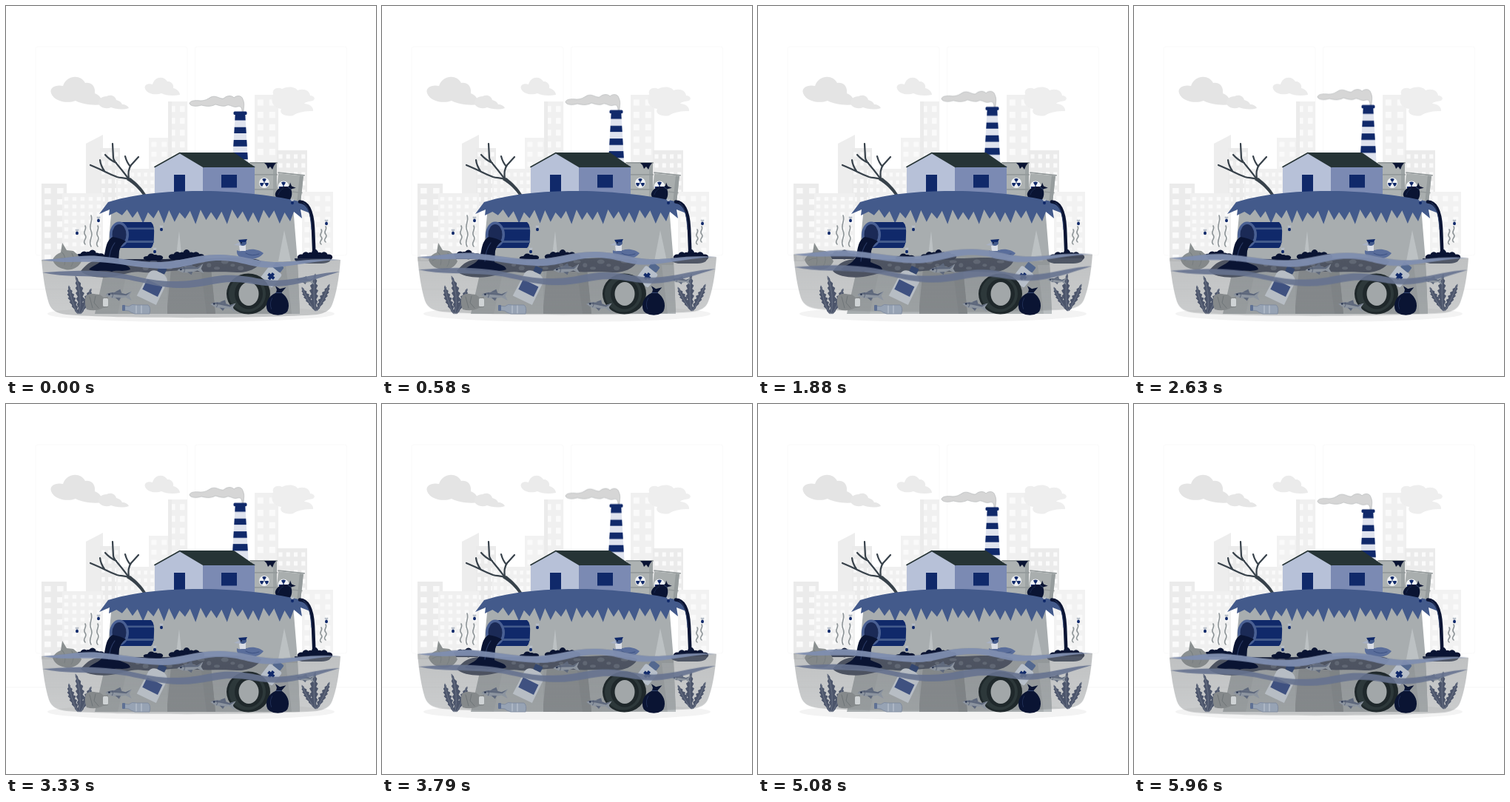
An HTML page for the animation above (6000 ms loop, 500x500 px).

```html
<!DOCTYPE html>
<html lang="en">
<head>
<meta charset="utf-8">
<title>Polluted island</title>
<style>
  html, body { margin: 0; width: 100%; height: 100%; overflow: hidden; background: #fff; }
  svg { display: block; width: 100vw; height: 100vh; }
</style>
</head>
<body>
<svg id="stage" viewBox="0 0 500 500"></svg>
<script>
const NAVY = '#10296a', INK = '#0a1433', SLATE = '#4c556b', CLIFF = '#a8adaf', BARK = '#37414a';

const path = (d, fill, extra = '') => `<path d="${d}" fill="${fill}" ${extra}/>`;
const line = (d, color, w) =>
  `<path d="${d}" fill="none" stroke="${color}" stroke-width="${w}" stroke-linecap="round" stroke-linejoin="round"/>`;
const rect = (x, y, w, h, fill, extra = '') =>
  `<rect x="${x}" y="${y}" width="${w}" height="${h}" fill="${fill}" ${extra}/>`;
const oval = (x, y, rx, ry, fill, extra = '') =>
  `<ellipse cx="${x}" cy="${y}" rx="${rx}" ry="${ry}" fill="${fill}" ${extra}/>`;
const group = (transform, body) => `<g transform="${transform}">${body}</g>`;
const range = n => Array.from({ length: n }, (_, i) => i);

// Block with a grid of pale windows
function building(x, y, w, h, cols, rows, fill = '#f0f0f0') {
  const cw = w / cols, rh = h / rows;
  let s = rect(x, y, w, h, fill);
  for (let r = 0; r < rows; r++)
    for (let c = 0; c < cols; c++)
      s += rect(x + cw * (c + .24), y + 3 + rh * (r + .2), cw * .5, rh * .5, '#fafafa');
  return s;
}

function city() {
  return building(336, 120, 32, 100, 2, 6) +
    building(366, 195, 41, 60, 4, 5, '#ebebeb') +
    building(400, 251, 42, 84, 3, 6, '#f2f2f2') +
    path('M108 186L131 174V270H108Z', '#ededed') +
    building(193, 178, 28, 80, 2, 6, '#f2f2f2') +
    building(219, 129, 26, 80, 2, 5) +
    rect(219, 129, 5, 80, '#ebebeb') +
    building(127, 192, 27, 85, 3, 7, '#ebebeb') +
    building(149, 220, 53, 42, 6, 4) +
    building(48, 240, 34, 105, 2, 7, '#ebebeb') +
    building(76, 253, 55, 82, 5, 8, '#f0f0f0');
}

const clouds = () =>
  path('M61 118C58 110 68 106 77 108C82 93 101 92 107 104C118 102 121 112 120 118C126 120 131 126 130 133C116 135 102 132 94 128C84 132 66 130 61 118Z', '#e4e4e4') +
  path('M125 132C124 126 130 122 136 122C142 119 148 122 149 127C153 128 156 130 157 133C161 133 165 135 166 138C157 141 148 139 142 137C135 140 127 137 125 132Z', '#e6e6e6') +
  path('M188 112C186 107 192 104 198 106C201 95 213 94 218 102C224 101 227 107 226 111C231 112 235 116 235 120C225 122 216 121 210 118C202 121 191 119 188 112Z', '#ebebeb') +
  path('M361 119C359 112 367 109 373 112C381 108 391 109 394 114C401 111 410 113 411 121C416 121 419 125 415 128C408 129 404 130 403 132C409 132 416 136 415 142C405 142 395 143 388 148C379 150 368 146 372 139C364 138 356 132 361 119Z', '#eeeeee');

function chimney() {
  const edge = (y, side) => 316.5 + side * (6.8 + (y - 147) * .058);
  const band = (a, b, fill) =>
    path(`M${edge(a, -1)} ${a}H${edge(a, 1)}L${edge(b, 1)} ${b}H${edge(b, -1)}Z`, fill);
  return path('M319 143C319 137 317 135 313 136C307 138 303 133 299 134C294 137 287 134 283 133C276 137 268 135 264 134C258 136 250 136 248 132C248 128 255 127 263 128C269 128 272 126 277 123C284 120 289 126 294 125C299 120 306 121 308 124C312 120 319 121 320 126C323 132 321 137 321 143Z',
      '#d6d6d6', 'stroke="#aeb1b2" stroke-width=".6"') +
    band(145, 225, '#dfe3ee') +
    range(4).map(i => band(146.500 + i * 17.2, 154.5 + i * 17.6, NAVY)).join('') +
    rect(307.5, 142.5, 18, 4.4, NAVY, 'rx="1.5"');
}

const tree = () =>
  path('M187 258C180 248 173 241 163 235L168 232C177 239 184 246 190 256Z', BARK) +
  line('M168 235C160 231 156 233 150 231Q142 228 134 224T114 215M133 223Q128 216 127 208', BARK, 2.2) +
  line('M166 234Q157 222 151 215T145 205L144 186M149 212Q140 208 134 201', BARK, 2.2) +
  line('M166 234Q164 222 169 215L179 204M168 217Q163 211 161 203', BARK, 2.2);

const house = () =>
  path('M201 218L235 199L267 218V253H201Z', '#b7c1d8') +
  path('M266 216H336V254H266Z', '#7b8ab3') +
  path('M234 198H308L337 218H267Z', '#263436') +
  line('M201 217.500L235 198.5L267 217.5', '#263436', 1.6) +
  rect(227, 228, 15, 24, NAVY) +
  rect(291, 228, 21, 17.5, NAVY);

// Hazard sign: disc with three blades
const hazard = (x, y, r) =>
  oval(x, y, r, r, '#f1f3f5') +
  [0, 120, 240].map(a => group(`translate(${x} ${y}) rotate(${a})`,
    path(`M0 0L${-r * .4} ${-r * .72}Q0 ${-r} ${r * .4} ${-r * .72}Z`, NAVY))).join('') +
  oval(x, y, r * .2, r * .2, '#f1f3f5') + oval(x, y, r * .12, r * .12, NAVY);

const garbage = (x, y, r, turn = 0) =>
  group(`translate(${x} ${y}) rotate(${turn}) scale(${r / 14})`,
    path('M-2 -14C-13 -10 -17 2 -13 10C-7 17 8 17 13 10C17 1 13 -9 5 -14L11 -21L3 -19L-3 -23L-1 -18Z', INK) +
    line('M-2 -14H5', '#34466f', 1.2) + line('M-7 -7Q-11 0 -8 7', '#1f2d54', 1));

const barrels = () =>
  rect(331, 212, 35, 46, '#adb2b2') + rect(361, 212, 5, 46, '#9da3a4') +
  [211, 227, 247].map(y => rect(329, y, 38, 1.8, '#949a9b', 'rx="1"')).join('') +
  path('M349 212H365L362 216L360 221L357 217L354 220L352 215Z', INK) +
  hazard(349, 239, 7) +
  group('rotate(6 384 247)',
    rect(366, 228, 34, 38, '#a9aeae') + rect(395, 228, 5, 38, '#969c9d') +
    rect(365, 226, 37, 1.8, '#949a9b', 'rx="1"') + rect(366, 250, 35, 1.6, '#949a9b')) +
  hazard(375, 244, 7.5) + garbage(376, 254, 10.5, 35);

const cliff = () =>
  path('M143 272H388L394 345L397 416H120L136 345Z', CLIFF) +
  path('M234 304L238 345H229ZM376 303L385 345H368Z', '#bcc1c3') +
  path('M224 345H276L283 416H217Z', '#898d90') +
  path('M262 345H276L283 416H271Z', '#808588') +
  path('M165 352L218 358V416H151Z', '#b1b6b8') +
  path('M378 350H394L397 416H386Z', '#b9bec0');

function turf() {
  let d = 'M126 281L138 265C180 252 226 250 268 250S372 257 399 265Q408 270 411 280L398 275L400 287L389 278';
  const n = 17;
  for (let i = 0; i < n; i++) {
    const x = 384 - i * 14.2;
    const tip = 291 + 4 * Math.sin(i * 2.3) - (i > 14 ? 5 : 0);
    d += `L${x} ${tip}L${x - 7.5} ${277 + 2 * Math.cos(i * 1.9)}`;
  }
  return path(d + 'L139 283L140 275Z', '#435a8b');
}

const pipe = () =>
  path('M153 292H196Q201 296 200 310Q200 324 196 327H153Z', NAVY) +
  rect(160, 299.5, 40, 2.6, '#435a8b') + rect(160, 317, 40, 3, '#435a8b') +
  oval(153, 309, 13, 17.5, '#4a6093') + oval(153, 309, 9.5, 14, '#1b2a56');

const flow = () =>
  path('M144 312C151 313 157 315 162 318Q155 323 153 331L152 346C157 349 167 350 168 356C158 360 150 356 143 359C133 356 120 360 112 356C117 350 126 350 132 340C135 331 134 318 144 312Z', INK) +
  line('M147 320Q140 329 139 345', '#2a3a63', 1.2);

// Lumpy heap resting on a base line
function pile(x, w, y, h) {
  const n = Math.round(w / 7);
  return range(n + 1).map(i => {
    const t = i / n, r = h * (.45 + .35 * Math.sin(Math.PI * t) + .12 * Math.sin(i * 2.6));
    return oval(x + 3 + t * (w - 6), y - r * .5, 5.2, r * .8, INK);
  }).join('') + rect(x, y - 3, w, 5, INK, 'rx="2.5"');
}

const sludge = () =>
  path('M101 358C108 351 112 343 132 342H215C245 340 270 342 300 340C320 340 340 341 345 345C342 353 328 361 312 360C288 358 272 361 250 358C226 355 208 362 186 360C171 357 158 364 142 366C128 368 108 366 101 358Z', '#232b43') +
  range(15).map(i => oval(178 + i * 10.7, 350 + 5 * Math.sin(i * 2.1), 3 + i % 3, 2 + i % 2, '#475066')).join('') +
  pile(97, 34, 340, 9) + pile(222, 44, 341, 10) + pile(188, 22, 342, 7) +
  pile(396, 43, 342, 11) + path('M390 341H438Q441 347 426 348H400Q389 346 390 341Z', '#26304a');

const fly = (x, y) =>
  oval(x - 2, y - 2, 2.2, 1.3, '#b6bdc8', `transform="rotate(35 ${x} ${y})"`) +
  oval(x + 2, y - 2, 2.2, 1.3, '#b6bdc8', `transform="rotate(-35 ${x} ${y})"`) +
  oval(x, y + 1, 2, 2.2, NAVY);

// Rising wavy stink line
const fume = (x, y, h) =>
  line(`M${x} ${y}c-5 ${-h * .2} 4 ${-h * .3} 0 ${-h * .5}s3 ${-h * .3} 0 ${-h * .5}`, '#8d9497', 1.6);

const fumes = () => fume(107, 322, 25) + fume(115, 325, 42) + fume(124, 325, 28) +
  fume(426, 322, 20) + fume(432, 319, 21);

const fish = (x, y, angle, size) => group(`translate(${x} ${y}) rotate(${angle}) scale(${size})`,
  path('M-17 0Q-7 -7 9 -2L17 -6L14 0L17 6L9 2Q-6 7 -17 0Z', '#8c949f') +
  path('M-16 -1Q-5 -6 9 -2L16 -5L10 0Q-4 -1 -16 -1Z', '#5e687c') +
  path('M-5 -4L2 -8L4 -3ZM-4 3L1 7L3 3Z', '#5e687c') +
  oval(-12, -.8, 1.2, 1.2, '#27324c') + line('M-8 -3Q-6 0 -8 3', '#4c566c', .7));

// Serrated leaf along a curved spine
function frond(x0, y0, x1, y1, bend, w) {
  const left = [], right = [], n = 14;
  const cx = (x0 + x1) / 2 + bend, cy = (y0 + y1) / 2;
  for (let i = 0; i <= n; i++) {
    const t = i / n, u = 1 - t;
    const x = u * u * x0 + 2 * u * t * cx + t * t * x1;
    const y = u * u * y0 + 2 * u * t * cy + t * t * y1;
    const r = w * Math.sin(Math.PI * (.08 + .9 * t)) * (i % 2 ? 1 : .55);
    left.push(`${x - r} ${y - r * .4}`);
    right.unshift(`${x + r} ${y - r * .4}`);
  }
  return path('M' + left.concat(right).join('L') + 'Z', SLATE) +
    line(`M${x0} ${y0}Q${cx} ${cy} ${x1} ${y1}`, '#747d8e', .7);
}

const weeds = () =>
  frond(97, 416, 85, 378, -4, 5.5) + frond(99, 416, 94, 365, 7, 6) + frond(101, 416, 115, 382, 2, 5.5) +
  frond(418, 412, 400, 380, -3, 5.5) + frond(418, 412, 418, 362, -4, 6) + frond(420, 412, 437, 376, 2, 5.5);

const duck = () =>
  path('M312 330C317 333 321 330 325 330C334 327 343 330 348 334C343 341 333 343 323 342C316 341 311 337 312 330Z', '#596d9b') +
  line('M324 334Q332 339 342 335', '#3d5283', 1) +
  path('M316 331L315 324Q318 319 324 321L324 331Z', '#d9dde5') +
  oval(320, 320, 5, 4, '#435a8b') + path('M316 319L308 323L317 324Z', '#a9b2c4') +
  path('M314 316L326 315L324 319H316Z', NAVY) + oval(318, 320, .9, .9, INK);

const bag = () =>
  path('M63 343C66 336 72 334 74 333L76 320L82 330L91 331L97 336L102 345C98 354 88 358 80 356C73 354 66 352 63 343Z', '#8b9091') +
  line('M76 333Q82 339 79 350M89 334Q94 343 88 352M68 344Q74 340 79 341', '#737b7d', 1);

const litter = () =>
  path('M108 392C114 386 121 390 127 390L132 394L138 393V407L131 408C124 412 116 412 109 410Q105 401 108 392Z', '#85898b') +
  line('M113 393L117 408M121 392L119 401L125 408', '#6f7578', 1) + rect(131, 395, 7, 11, '#cfd3d5', 'rx="1.5"') +
  group('rotate(26 199 380)',
    path('M185 366Q186 359 194 358H204Q211 360 213 366V400H184Z', '#b7bdc4') +
    rect(194, 350, 11, 8, '#33466f', 'rx="1.5"') + rect(187, 374, 23, 15, '#3f5180')) +
  path('M158 405L166 406Q170 402 176 404H192Q196 407 194 416H174Q168 414 166 412L158 411Z', '#97a3b4', 'stroke="#74819a" stroke-width=".7"') +
  rect(157, 404, 4, 8, '#5f7194', 'rx="1"') + line('M176 405V415M183 405V415', '#c2cad5', 1) +
  group('rotate(38 361 361)',
    rect(351, 355, 21, 23, '#b7bfca', 'rx="3"') + rect(355, 346, 13, 9, '#53688f', 'rx="1.5"') +
    path('M359.500 361H363.500V364H366.500V368H363.500V371H359.500V368H356.500V364H359.500Z', NAVY));

const tyre = () =>
  oval(327.5, 389, 29.5, 27.5, '#1f282b') +
  oval(326, 389, 25, 24.5, '#2d383a') +
  oval(328, 389, 19, 20.5, '#1f282b') +
  oval(328, 389, 13.5, 16, '#a2a7a9');

const TOP = 'M48 343C78 342 96 336 125 338S180 347 209 346S258 335 290 336S336 345 362 346S408 340 452 343';
const BASE = 'C450 370 446 390 441 403C437 413 430 415 420 417C360 422 150 423 82 417C68 415 62 412 58 402C53 386 50 366 48 343Z';

const bands = () =>
  path(TOP + 'C420 344 397 350 366 353S322 345 292 344S242 356 209 355S151 347 125 346S76 348 48 343Z', '#7f8fb1', 'opacity=".93"') +
  path('M49 360C85 358 112 356 145 360S195 373 232 372S280 362 310 364S350 373 378 370S425 360 451 359C430 365 405 375 378 378S335 374 310 373S265 382 232 381S178 370 145 367S80 367 49 360Z', '#66738f', 'opacity=".9"');

const backdrop =
  rect(40, 55, 205, 282, '#fff', 'rx="3" stroke="#fafafa"') +
  rect(255.500, 55, 205, 282, '#fff', 'rx="3" stroke="#fafafa"') +
  rect(0, 382.500, 500, .8, '#f3f3f3') + oval(250, 416, 194, 11, '#f3f3f3');

const flies = [[96, 306], [125, 289], [210, 301], [201, 331], [387, 265], [433, 293]];

document.getElementById('stage').innerHTML =
  `<defs><linearGradient id="wash" x1="0" y1="0" x2="0" y2="1">
    <stop offset="0" stop-color="#7d8183" stop-opacity=".5"/>
    <stop offset="1" stop-color="#7d8183" stop-opacity=".4"/>
  </linearGradient></defs>` +
  backdrop + city() + clouds() +
  `<g class="stack">${chimney()}</g>` +
  tree() + barrels() + house() + cliff() + turf() +
  line('M397 264.500C409 265 414 281 415 300L416.5 338', INK, 4.6) +
  line('M402 266C410 271 412 287 413 302', '#2d416f', .9) +
  sludge() + pipe() + fumes() + flies.map(f => fly(...f)).join('') +
  duck() + bag() +
  `<g class="water">${path(TOP + BASE, 'url(#wash)')}</g>` +
  flow() + weeds() + litter() + tyre() + garbage(367, 402, 14.5) +
  fish(152, 391, 2, 1.05) + fish(249, 356, -4, 1.05) + fish(293, 405, 8, 1) + fish(404, 371, 4, .75) +
  `<g class="water">${bands()}</g>`;

// Straight up-and-down drift of 10 units
function drift(selector, duration) {
  for (const el of document.querySelectorAll(selector))
    el.animate([{ transform: 'translateY(0px)' }, { transform: 'translateY(-10px)' }],
      { duration, iterations: Infinity, direction: 'alternate', easing: 'linear' });
}
drift('.stack', 3000);
drift('.water', 1500);
</script>
</body>
</html>
```
